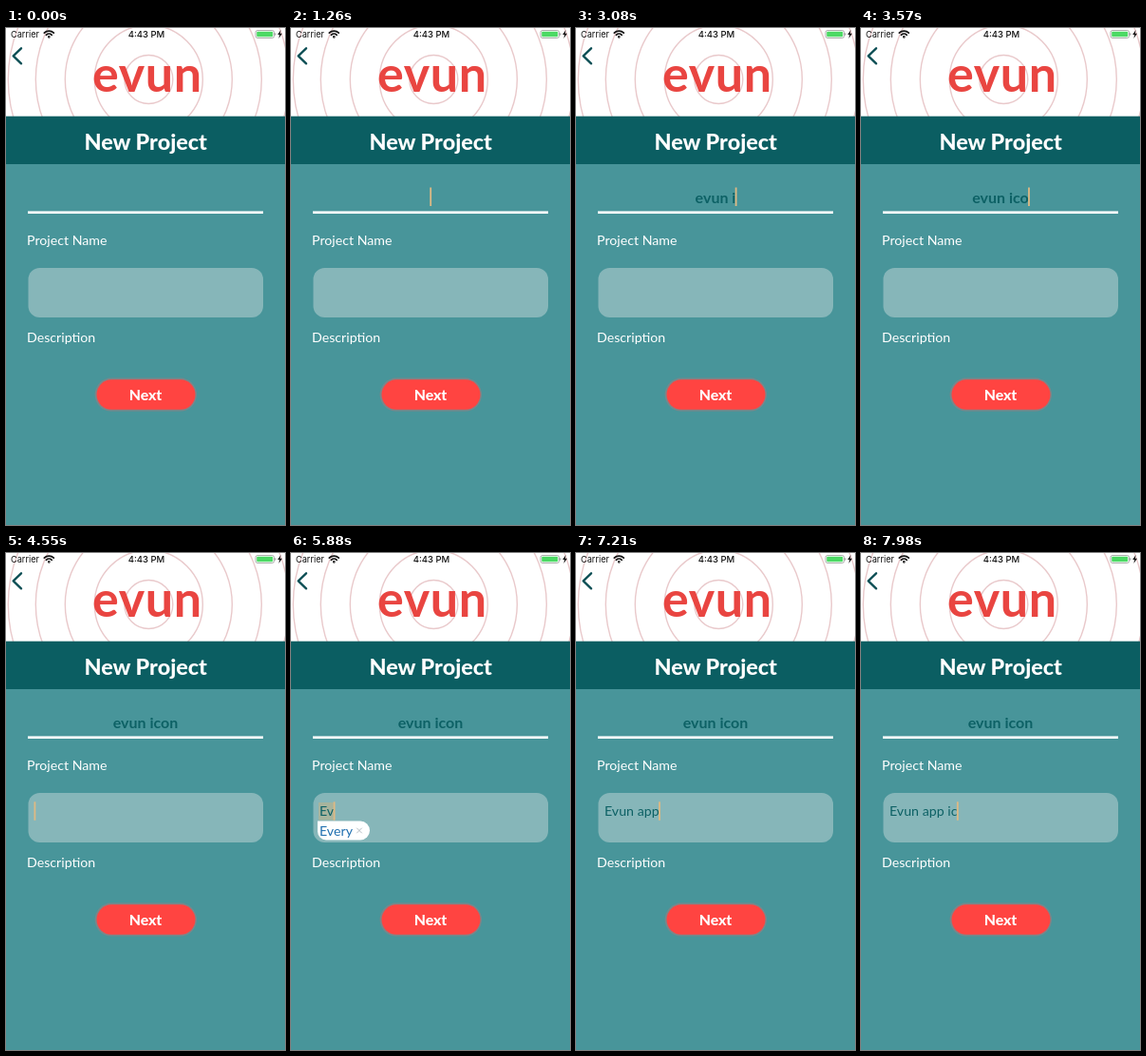
An HTML page for the animation above (8000 ms loop, 294x522 px).

```html
<!DOCTYPE html>
<html lang="en">
<head>
<meta charset="utf-8">
<title>New Project</title>
<style>
  html, body { margin: 0; width: 100%; height: 100%; overflow: hidden; }
  svg { display: block; width: 294px; height: 522px; font-family: Lato, sans-serif; }
  text { white-space: pre; }
  .status { font-family: Inter, sans-serif; fill: #111; }
  .bold { font-weight: 700; }
  .heavy { font-weight: 800; }
  .mid { text-anchor: middle; }
  .body { font-size: 14.2px; }
  .white { fill: #fff; }
  .ink { fill: #0d6165; }
  .line { fill: none; stroke-linecap: round; stroke-linejoin: round; }
</style>
</head>
<body>
<svg viewBox="0 0 294 522">
  <rect width="294" height="93" fill="#fff"/>
  <g id="rings" fill="none" stroke="#e9c9cb" stroke-width="1.4"></g>
  <rect y="93" width="294" height="429" fill="#48959a"/>

  <text class="status" x="5" y="10" font-size="9.2">Carrier</text>
  <g class="line" stroke="#111" stroke-width="1.7">
    <path d="M40.3 5.2a7.2 7.2 0 0 1 10 0M42.4 7.3a4.2 4.2 0 0 1 5.8 0"/>
    <circle cx="45.3" cy="9.3" r=".5"/>
  </g>
  <text class="status mid" x="148" y="10" font-size="9.5" font-weight="500">4:43 PM</text>
  <rect x="263" y="2.5" width="19.5" height="8" rx="2" fill="none" stroke="#999" stroke-width=".8"/>
  <rect x="264.2" y="3.7" width="17" height="5.6" rx="1" fill="#4cd964"/>
  <path d="M283.3 5v3q1.2-.4 1.2-1.5t-1.2-1.5" fill="#999"/>
  <path d="M289.6 2l-3.4 5h2.1l-.9 4 3.6-5.2h-2.2z" fill="#111"/>
  <path class="line" d="M16 21.3L7.7 29.3l8.3 8" stroke="#0e4f55" stroke-width="2.4"/>
  <text class="bold" x="91" y="66.5" font-size="52" letter-spacing=".6" fill="#e94541">evun</text>

  <rect y="92.7" width="294" height="50.3" fill="#0b5e62"/>
  <text class="heavy mid white" x="147.2" y="127.5" font-size="23.4">New Project</text>

  <rect x="23" y="192.4" width="248" height="2.6" class="white"/>
  <text class="body white" x="22" y="228">Project Name</text>
  <rect x="23.5" y="252" width="247.5" height="52" rx="12" fill="#86b6b9"/>
  <text class="body white" x="22" y="330.3">Description</text>

  <rect x="93.6" y="367.6" width="107.4" height="35" rx="17.5" fill="#8b8284" opacity=".75"/>
  <rect x="95.5" y="369.3" width="104" height="31.5" rx="15.7" fill="#ff4441"/>
  <text class="heavy mid white" x="147" y="391" font-size="15.8">Next</text>

  <rect id="mark" x="29" y="262" height="18.5" fill="#c9b382" opacity=".5"/>
  <text id="name" class="bold mid ink" x="147" y="183.5" font-size="16"></text>
  <text id="about" class="body ink" x="30" y="276"></text>
  <g id="hint">
    <path d="M28 281.5h45a10 10 0 0 1 0 20H37a9 9 0 0 1-9-9z" class="white"/>
    <text class="body" x="30" y="296.5" fill="#2170b0">Every</text>
    <path class="line" d="M69.5 289l5 5m0-5l-5 5" stroke="#b5bcc2" stroke-width="1"/>
  </g>
  <rect id="caret" width="1.8" height="19.5" fill="#dfb983"/>
</svg>
<script>
const LOOP = 8000;
const $ = id => document.getElementById(id);
const clamp = v => Math.min(1, Math.max(0, v));

$('rings').innerHTML = [25.5, 57, 88, 119, 148]
  .map(r => `<circle cx="150.3" cy="54" r="${r}"/>`).join('');

// Each field: time of focus, then the time of every key press.
const fields = [
  { el: $('name'), text: 'evun icon', focus: 1050, top: 167.5,
    keys: [1540, 1820, 2100, 2310, 2660, 2940, 3290, 3500, 3780] },
  { el: $('about'), text: 'Evun app ic', focus: 4200, top: 261.3,
    keys: [5460, 5740, 6020, 6230, 6510, 6860, 7070, 7210, 7490, 7770, 7910] }
];

// Solid after a key press, then fades out and back in.
function blink(age) {
  const t = age % 1100;
  return t < 800 ? clamp((660 - t) / 100) : clamp((t - 960) / 140);
}

function draw(t) {
  for (const f of fields) {
    f.count = f.keys.filter(k => k <= t).length;
    f.el.textContent = f.text.slice(0, f.count);
  }
  const [name, about] = fields;
  const active = t >= about.focus ? about : name;
  const width = active.count ? active.el.getComputedTextLength() : 0;
  const caret = $('caret');
  caret.setAttribute('x', active === name ? 146.3 + width / 2 : 29.5 + width);
  caret.setAttribute('y', active.top);
  const last = active.count ? active.keys[active.count - 1] : active.focus;
  caret.setAttribute('opacity', t < active.focus ? 0 : blink(t - last));

  const hinting = about.count === 2;
  $('hint').setAttribute('visibility', hinting ? 'visible' : 'hidden');
  $('mark').setAttribute('width', hinting ? width + 1 : 0);
}

function tick() {
  draw(performance.now() % LOOP);
  requestAnimationFrame(tick);
}
tick();
</script>
</body>
</html>
```
